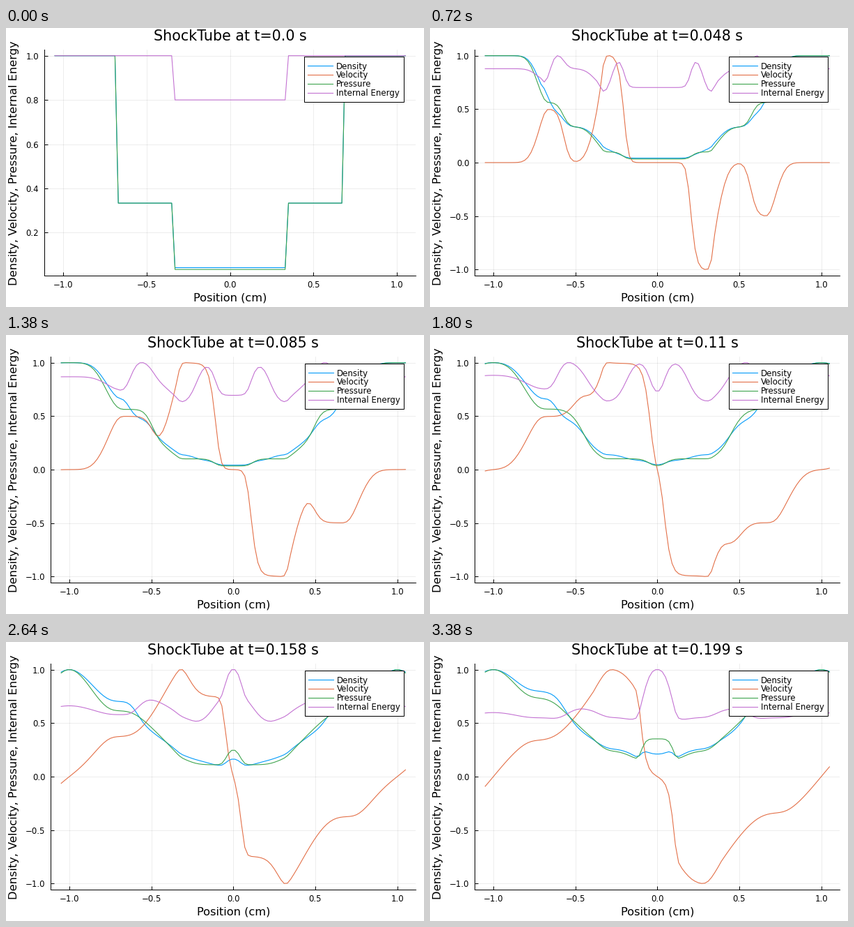
A matplotlib script that plays this animation: 600x400 px, repeating every 3400 ms.

```python
import numpy as np
import matplotlib.pyplot as plt
from matplotlib.animation import FuncAnimation
from matplotlib.patches import Rectangle
from matplotlib.transforms import Affine2D

W, H, DPI = 600, 400, 100
FRAMES, INTERVAL = 170, 20
PX = 72 / DPI

GAMMA = 1.4
DX, GHOST = 0.02, 3
SPEED = 1.43  # ratio of solver time to displayed time
STATES = 74

TOP, BOTTOM, RIGHT = 30.5, 355.4, 588.2
SERIES = [("Density", "#009afa"), ("Velocity", "#e36f47"),
          ("Pressure", "#3ea44e"), ("Internal Energy", "#c371d2")]

plt.rcParams["font.family"] = "DejaVu Sans"


# ---- gas dynamics: first-order Roe solver between reflecting walls ----

def conserved(q):
    rho, u, p = q
    return np.array([rho, rho * u, p / (GAMMA - 1) + rho * u**2 / 2])


def primitive(cons):
    rho, mom, energy = cons
    u = mom / rho
    return np.array([rho, u, (GAMMA - 1) * (energy - rho * u**2 / 2)])


def physical_flux(q):
    _, u, p = q
    return conserved(q) * u + np.array([0 * p, p, p * u])


def enthalpy(q):
    rho, u, p = q
    return GAMMA / (GAMMA - 1) * p / rho + u**2 / 2


def roe_flux(left, right):
    wl, wr = np.sqrt(left[0]), np.sqrt(right[0])
    u = (wl * left[1] + wr * right[1]) / (wl + wr)
    h = (wl * enthalpy(left) + wr * enthalpy(right)) / (wl + wr)
    c = np.sqrt((GAMMA - 1) * (h - u**2 / 2))
    d_rho, d_u, d_p = right - left
    kick = wl * wr * c * d_u
    one = np.ones_like(u)
    waves = [
        (u - c, (d_p - kick) / (2 * c**2), [one, u - c, h - u * c]),
        (u, d_rho - d_p / c**2, [one, u, u**2 / 2]),
        (u + c, (d_p + kick) / (2 * c**2), [one, u + c, h + u * c]),
    ]
    spread = sum(np.abs(s) * a * np.array(vec) for s, a, vec in waves)
    return (physical_flux(left) + physical_flux(right) - spread) / 2


def reflect(q):
    mirror = np.array([[1], [-1], [1]])
    q[:, :GHOST] = mirror * q[:, 5:2:-1]
    q[:, -GHOST:] = mirror * q[:, -4:-7:-1]
    return q


def advance(q, dt):
    flux = roe_flux(q[:, :-1], q[:, 1:])
    cons = conserved(q)
    cons[:, 1:-1] -= dt / DX * (flux[:, 1:] - flux[:, :-1])
    return reflect(primitive(cons))


def normalised(q):
    rho, u, p = q
    e = p / rho
    peak = np.abs(u).max()
    vel = u / peak if peak > 0 else np.full_like(u, np.nan)
    return [rho / rho.max(), vel, p / p.max(), e / e.max()]


x = -1.05 + DX * np.arange(106)
times = np.interp(np.arange(STATES),
                  [0, 1, 16, 29, 38, 47, 56, 73],
                  [0, .0054, .048, .0849, .1102, .1348, .1583, .1988])

dist = np.abs(x)
gas = np.array([np.where(dist < .34, .125, np.where(dist < .68, 1., 3.)),
                np.zeros_like(x),
                np.where(dist < .34, .1, np.where(dist < .68, 1., 3.))])
history = [normalised(gas)]
for step in np.diff(times):
    gas = advance(gas, SPEED * step)
    history.append(normalised(gas))


# ---- figure ----

fig = plt.figure(figsize=(W / DPI, H / DPI), dpi=DPI, facecolor="white")

ax = fig.add_axes([0.1, 0.1, 0.8, 0.8])
ax.set_xlim(-1.113, 1.113)
ax.set_xticks([-1, -.5, 0, .5, 1])
ax.set_axisbelow(True)
ax.grid(color="black", alpha=.1, lw=.5)
ax.spines[["top", "right"]].set_visible(False)
ax.spines[["left", "bottom"]].set_linewidth(PX)
ax.tick_params(direction="in", length=5 * PX, width=PX, labelsize=8.5)
ax.tick_params(axis="x", pad=6.8 * PX)
ax.tick_params(axis="y", pad=8 * PX)
curves = [ax.plot([], [], color=color, lw=1.1 * PX, snap=False)[0]
          for _, color in SERIES]

# Overlay in stage pixels for the text and the legend
over = fig.add_axes([0, 0, 1, 1], zorder=5)
over.set_xlim(0, W)
over.set_ylim(H, 0)
over.axis("off")

title = over.text(0, 18, "", size=14.9, ha="center")
xlabel = over.text(0, 392, "Position (cm)", size=11.73, ha="center")
over.text(16, 193.4, "Density, Velocity, Pressure, Internal Energy",
          size=11.7, ha="center", va="baseline",
          rotation=90, rotation_mode="anchor")

box = over.add_patch(Rectangle((428.8, 41), 141.9, 65, fc="white",
                               ec="black", lw=PX))
shift = Affine2D()
for row, (name, color) in enumerate(SERIES):
    y = 54.2 + 13 * row
    place = shift + over.transData
    over.plot([434.3, 470], [y, y], color=color, lw=1.1 * PX, transform=place)
    over.text(474.6, y + 4.3, name, size=8.48, transform=place)


def state_at(frame):
    # Three states per seven ticks; the middle one is held
    cycle, tick = divmod(frame, 7)
    return 3 * cycle + (0 if tick == 0 else 2 if tick == 6 else 1)


def draw(frame):
    k = state_at(frame)
    start = k == 0
    data = history[k]
    for curve, values in zip(curves, data):
        curve.set_data(x, values)

    low, high = np.nanmin(data), np.nanmax(data)
    margin = .03 * (high - low)
    ax.set_ylim(low - margin, high + margin)
    ax.set_yticks([.2, .4, .6, .8, 1] if start else [-1, -.5, 0, .5, 1])

    left = 55.1 if start else 64.4
    ax.set_position([left / W, 1 - BOTTOM / H,
                     (RIGHT - left) / W, (BOTTOM - TOP) / H])
    center = (left + RIGHT) / 2
    title.set_x(center)
    xlabel.set_x(center)
    title.set_text(f"ShockTube at t={round(float(times[k]), 3)} s")

    box.set_x(427.7 if start else 428.8)
    box.set_width(570.7 - box.get_x())
    shift.clear().translate(-1 if start else 0, 0)
    return [*curves, title]


anim = FuncAnimation(fig, draw, frames=FRAMES, interval=INTERVAL,
                     repeat=True, repeat_delay=0, blit=False)
plt.show()
```
